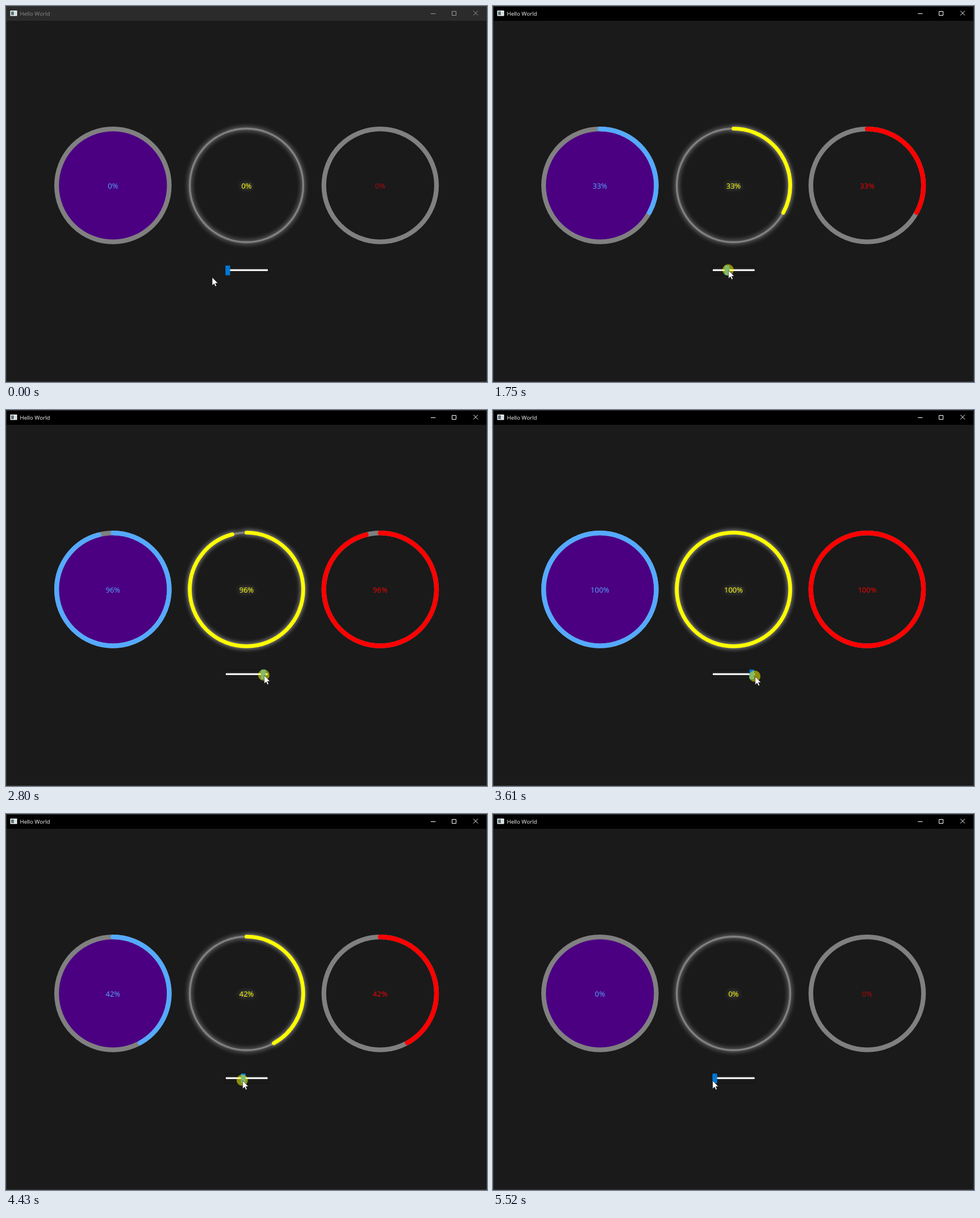
An HTML page for the animation above (6.05 s loop, 847 by 661 pixels).

```html
<!DOCTYPE html>
<html lang="en">
<head>
<meta charset="utf-8">
<title>Hello World</title>
<style>
  html, body { margin: 0; width: 100%; height: 100%; overflow: hidden; background: #1a1a1a; }
  svg { display: block; width: 847px; height: 661px; }
  text { font-family: "Open Sans", "Noto Sans", sans-serif; }
  #bar { fill: #2b2b2b; }
  #title { font-size: 9.7px; fill: #8c8c8c; }
  #buttons { fill: none; stroke: #9c9c9c; }
  .active #bar { fill: #000; }
  .active #title { fill: #fff; }
  .active #buttons { stroke: #fff; }
  #focus { visibility: hidden; fill: none; stroke: #000; stroke-opacity: .6; stroke-dasharray: 1 1; }
  .active #focus { visibility: visible; }
  .label { font-size: 13px; text-anchor: middle; }
  .arc { fill: none; stroke-linecap: round; }
</style>
</head>
<body>
<svg id="stage" viewBox="0 0 847 661">
  <defs>
    <filter id="glow" x="-20%" y="-20%" width="140%" height="140%" color-interpolation-filters="sRGB">
      <feDropShadow dx="0" dy="0" stdDeviation="4" flood-color="#fff" flood-opacity=".7"/>
    </filter>
  </defs>
  <rect width="847" height="661" fill="#1a1a1a"/>
  <rect id="bar" y="1" width="847" height="25"/>
  <rect x=".5" y=".5" width="846" height="660" fill="none" stroke="#3d3d3d"/>
  <rect x="7.5" y="8" width="12" height="9.5" fill="#f4f4f4"/>
  <rect x="9" y="9.5" width="5" height="6.5" fill="#56757c"/>
  <rect x="15" y="9.5" width="3" height="6.5" fill="#d5d9da"/>
  <text id="title" x="24.5" y="16.5">Hello World</text>
  <path id="buttons" d="M748 13.5h8.5M785.5 9.5h7v7h-7zM823 8.5l8 8M831 8.5l-8 8"/>
  <g id="dials"></g>
  <rect x="387" y="462.7" width="74" height="3.3" fill="#eef0ee"/>
  <rect id="focus" x="386.5" y="456.5" width="74" height="17"/>
  <rect id="handle" y="456.3" width="8.2" height="17" fill="#0078d7"/>
  <circle id="press" r="10" fill="#ff0" fill-opacity=".5"/>
  <path id="cursor" d="M0 0V14.2L3.3 11.2 5.5 16 7.7 15 5.6 10.2H10Z" fill="#fff" stroke="#111" stroke-width=".6"/>
</svg>
<script>
const LOOP = 6050, PRESS = 940, RELEASE = 5520;
const get = id => document.getElementById(id);

const dials = [
  { x: 188.3, r: 99.2, track: 8.2, width: 8.2, color: '#55aaff', fill: '#4b0082' },
  { x: 423.5, r: 99.9, track: 3.4, width: 6.7, color: '#ffff00', fill: 'none', glow: true },
  { x: 658.9, r: 99.2, track: 8.2, width: 8.2, color: '#ff0000', fill: 'none' }
];

get('dials').innerHTML = dials.map(d => `
  <g ${d.glow ? 'filter="url(#glow)"' : ''}>
    <circle cx="${d.x}" cy="315.4" r="${d.r}" fill="${d.fill}" stroke="#808080" stroke-width="${d.track}"/>
    <circle class="arc" cx="${d.x}" cy="315.4" r="${d.r}" stroke="${d.color}" stroke-width="${d.width}"
      pathLength="100" transform="rotate(-90 ${d.x} 315.4)"/>
    <text class="label" x="${d.x}" y="320.7" fill="${d.color}"></text>
  </g>`).join('');
const arcs = document.querySelectorAll('.arc');
const labels = document.querySelectorAll('.label');

// Pointer moves: first step, last step, step count, then percent, x and y reached.
const moves = [
  [260, 610, 6, 0, 389, 463.5],
  [1330, 1750, 7, 33, 414, 464],
  [1820, 2310, 8, 77, 441.5, 466],
  [2380, 2520, 3, 88, 449, 466],
  [2590, 2800, 4, 96, 454, 466],
  [3060, 3410, 6, 100, 461, 468],
  [3870, 4430, 9, 42, 416, 468],
  [4500, 5050, 9, 4, 390, 468],
  [5120, 5320, 4, 0, 386, 468]
];

function poseAt(t) {
  let pose = [0, 362.3, 476.3];
  for (const [start, end, count, ...goal] of moves) {
    if (t < start) break;
    const step = (end - start) / (count - 1);
    const done = Math.min(1, (Math.floor((t - start) / step + 1e-6) + 1) / count);
    pose = pose.map((v, i) => v + (goal[i] - v) * done);
  }
  return pose;
}

function draw(t) {
  const [value, x, y] = poseAt(t);
  const percent = Math.round(value);
  get('stage').classList.toggle('active', t >= PRESS);
  arcs.forEach(a => {
    a.style.visibility = percent ? 'visible' : 'hidden';
    a.setAttribute('stroke-dasharray', percent < 100 ? `${percent} 200` : 'none');
  });
  labels.forEach(l => l.textContent = percent + '%');
  labels[2].setAttribute('fill', percent ? '#f00' : '#b40a0a');
  get('handle').setAttribute('x', 386.4 + percent * .652);
  const press = get('press');
  press.style.visibility = t >= PRESS && t < RELEASE ? 'visible' : 'hidden';
  press.setAttribute('transform', `translate(${x} ${y})`);
  get('cursor').setAttribute('transform', `translate(${x + .8} ${y + .8})`);
}

const begin = performance.now();
function tick() {
  draw((performance.now() - begin) % LOOP);
  requestAnimationFrame(tick);
}
tick();
</script>
</body>
</html>
```
